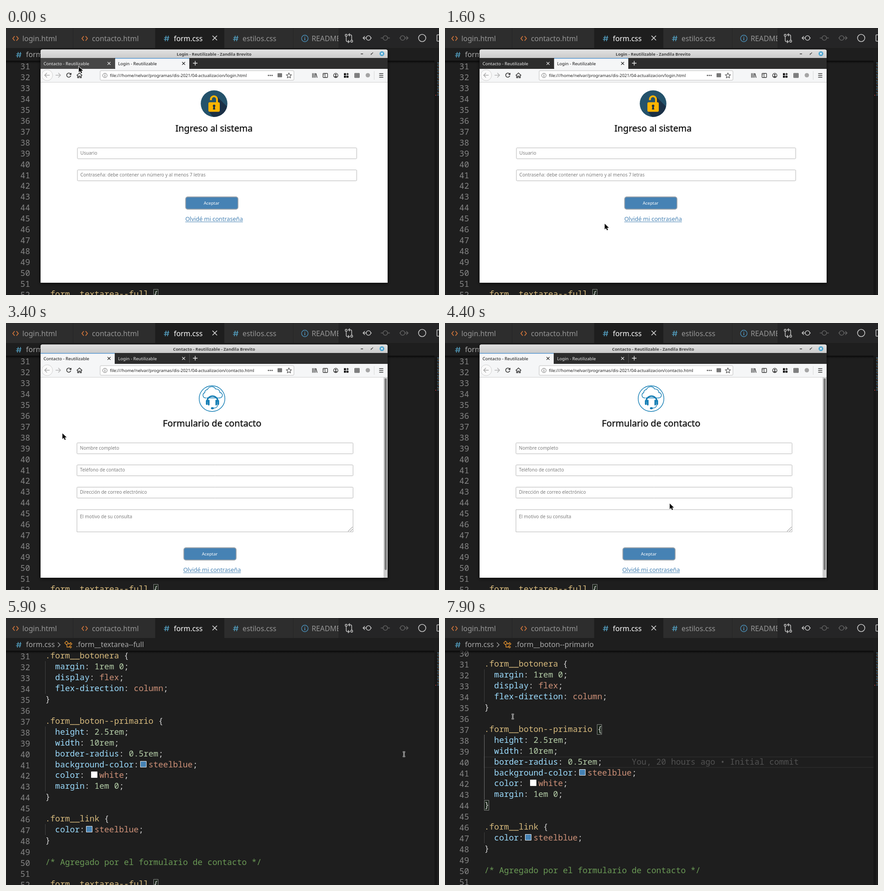
Recreate the animation shown at these times as an HTML page with a canvas. Size 952x588 px, loop 8 s.

```html
<!DOCTYPE html>
<html lang="es">
<head>
<meta charset="utf-8">
<title>Formularios</title>
<style>
  html, body { margin: 0; width: 100%; height: 100%; overflow: hidden; background: #1e1e1e; }
  canvas { display: block; }
</style>
</head>
<body>
<canvas id="stage" width="952" height="588"></canvas>
<script>
const ctx = document.getElementById('stage').getContext('2d');
const LOOP = 8000, STEP = 100;
const SWITCH = 2800, CLOSE = 5900, CLICK = 6000, BLAME = 6100, SCROLL = 7900;
const SANS = '"Noto Sans", sans-serif', MONO = '"Noto Sans Mono", monospace';
const CHAR = 10.8, LINE = 23.95, LEFT = 86.5;

const code = [
  '', '.form__botonera {', '  margin: 1rem 0;', '  display: flex;', '  flex-direction: column;', '}', '',
  '.form__boton--primario {', '  height: 2.5rem;', '  width: 10rem;', '  border-radius: 0.5rem;',
  '  background-color:steelblue;', '  color: white;', '  margin: 1em 0;', '}', '',
  '.form__link {', '  color:steelblue;', '}', '',
  '/* Agregado por el formulario de contacto */', '', '.form__textarea--full {'
];
const FIRST = 30;

// Pointer path: time, x, y
const path = [
  [0, 160, 85], [300, 160, 85], [600, 330, 240], [900, 522, 395], [1200, 346, 429], [1400, 345, 436],
  [1600, 351, 431], [1800, 290, 300], [2100, 130, 96], [2400, 142, 74], [3300, 142, 74], [3400, 124, 243],
  [3900, 564, 435], [4200, 520, 407], [4600, 468, 388], [4900, 468, 388], [5100, 652, 331], [5200, 652, 331],
  [5800, 875, 300], [6100, 875, 300], [6800, 205, 222], [7000, 167, 254], [7200, 149, 217], [LOOP, 149, 217]
];

function pointer(t) {
  const i = path.findIndex(p => p[0] > t);
  const [a, b] = [path[i - 1], path[i]];
  const k = (t - a[0]) / (b[0] - a[0]);
  return [a[1] + (b[1] - a[1]) * k, a[2] + (b[2] - a[2]) * k];
}

function box(x, y, w, h, fill, radius = 0, border, width = 1) {
  ctx.beginPath();
  ctx.roundRect(x, y, w, h, radius);
  if (fill) { ctx.fillStyle = fill; ctx.fill(); }
  if (border) { ctx.strokeStyle = border; ctx.lineWidth = width; ctx.stroke(); }
}

function disc(x, y, r, fill, border, width) {
  box(x - r, y - r, 2 * r, 2 * r, fill, r, border, width);
}

function stroke(d, color, width = 1.3) {
  ctx.strokeStyle = color;
  ctx.lineWidth = width;
  ctx.stroke(new Path2D(d));
}

function fill(d, color) {
  ctx.fillStyle = color;
  ctx.fill(new Path2D(d));
}

function text(s, x, y, size, color, { align = 'left', weight = 400, family = SANS } = {}) {
  ctx.font = `${weight} ${size}px ${family}`;
  ctx.textAlign = align;
  ctx.fillStyle = color;
  ctx.fillText(s, x, y);
}

const cross = (x, y, r, color, w) =>
  stroke(`M${x - r} ${y - r}l${2 * r} ${2 * r}M${x + r} ${y - r}l${-2 * r} ${2 * r}`, color, w);
const tagIcon = x => stroke(`M${x - 2} 18l-4 5l4 5M${x + 2} 18l4 5l-4 5`, '#d0743a', 1.8);
const hashIcon = (x, y) =>
  stroke(`M${x - 1} ${y - 6}l-2 12M${x + 4} ${y - 6}l-2 12M${x - 5} ${y - 2}h11M${x - 6} ${y + 2}h11`, '#519aba', 1.7);

function editorTabs(clicked) {
  box(0, 0, 952, 44, '#252526');
  for (const [x, w] of [[0, 147], [148, 180], [480, 151], [632, 99]]) box(x, 0, w, 44, '#2d2d2d');
  box(328, 0, 152, 44, '#1e1e1e');
  tagIcon(21);
  tagIcon(173);
  hashIcon(353, 23);
  hashIcon(505, 23);
  const label = (s, x, color = '#969696') => text(s, x, 29, 15.8, color);
  label('login.html', 36);
  label('contacto.html', 189);
  label('form.css', 369, '#fff');
  label('estilos.css', 520);
  cross(459, 22, 5, '#e0e0e0', 1.5);
  disc(657, 23, 7.2, null, '#4a8fb8', 1.4);
  stroke('M657 19v1.8M657 22v5', '#4a8fb8', 1.8);
  ctx.save();
  ctx.beginPath();
  ctx.rect(632, 0, 99, 44);
  ctx.clip();
  label('README.md', 672);
  ctx.restore();

  const icon = '#c5c5c5', dim = '#626262';
  stroke('M748 18v9q0 3 3 3h4m-3-3l3 3l-3 3M760 27v-9q0-3-3-3h-4m3-3l-3 3l3 3', icon, 1.5);
  disc(748, 16, 2.2, null, icon, 1.4);
  disc(760, 29, 2.2, null, icon, 1.4);
  disc(797, 22, 5, null, icon, 1.5);
  stroke('M792 22h-7m4-4l-4 4l4 4M802 22h2', icon, 1.5);
  disc(834, 22, 5, null, dim, 1.5);
  stroke('M824 22h5M839 22h5', dim, 1.5);
  disc(872, 22, 5, null, dim, 1.5);
  stroke('M865 22h2M877 22h7m-4-4l4 4l-4 4', dim, 1.5);
  disc(915, 22, 8, null, icon, 1.6);
  box(947.5, 15, 12, 14, null, 1, icon, 1.5);

  box(0, 44, 952, 28, '#1e1e1e');
  hashIcon(28, 59);
  text('form.css', 44, 64, 15.8, '#a9a9a9');
  stroke('M114 54l5 5l-5 5', '#a9a9a9');
  stroke('M129 55l4-4l4 4l-4 4zM136 57h4M134 59v5h5M140 56l2-2l3 3l-2 2zM139 63l2-2l3 3l-2 2z', '#e0912f', 1.4);
  text(clicked ? '.form__boton--primario' : '.form__textarea--full', 154, 64, 15.8, '#a9a9a9');
}

function codeLine(line, y) {
  let x = LEFT;
  const put = (s, color) => {
    text(s, x, y, 18, color, { family: MONO });
    x += s.length * CHAR;
  };
  const rule = line.match(/^(  )([\w-]+)(: ?)(.*);$/);
  if (rule) {
    x += 2 * CHAR;
    put(rule[2], '#9cdcfe');
    put(rule[3], '#d4d4d4');
    if (/blue|white/.test(rule[4])) {
      box(Math.round(x + 3) + .5, y - 13.5, 13, 13, rule[4], 0, '#eee');
      x += 21.5;
    }
    put(rule[4], /\d/.test(rule[4]) ? '#b5cea8' : '#ce9178');
    put(';', '#d4d4d4');
  } else if (line[0] === '.') {
    put(line.slice(0, -1), '#d7ba7d');
    put('{', '#d4d4d4');
  } else put(line, line[0] === '/' ? '#6a9955' : '#d4d4d4');
}

function editor(t) {
  const clicked = t >= CLICK, scroll = t >= SCROLL ? 18 : 0;
  const base = n => Math.round(89 + (n - 31) * LINE) + scroll;
  const brace = (n, column) =>
    box(Math.floor(LEFT + column * CHAR) + .5, base(n) - 16.5, 10, 22, 'rgba(0,100,0,.1)', 0, '#888');
  box(0, 44, 952, 544, '#1e1e1e');
  if (clicked) {
    box(86, base(40) - 17, 857, 23, null, 0, '#282828', 2);
    brace(37, 23);
    brace(44, 0);
  } else brace(52, 22);
  code.forEach((line, i) => {
    const n = FIRST + i, y = base(n);
    if (line[0] === ' ') box(86, y - 18, 1, 24, clicked && n > 37 && n < 44 ? '#707070' : '#404040');
    codeLine(line, y);
    text(n, 53, y + 2, 18, '#858585', { align: 'right', family: MONO });
  });
  if (t >= BLAME) text('You, 20 hours ago • Initial commit', 410.5, base(40), 18, '#515151', { family: MONO });
  if (clicked && (t - CLICK) % 1000 < 500) box(346, base(40) - 17, 2, 23, '#aeafad');

  box(942, 72, 6, 516, '#171717');
  ['#51768a', '#77694a', '#456b85', '#6c5547'].forEach((c, i) => {
    for (let y = 76 + i * 3; y < 148; y += 13) box(948 + i % 2, y, 4 - i % 2, 1.5, c);
  });
  box(944, 147, 2, 2, '#a03030');
  const shade = ctx.createLinearGradient(0, 72, 0, 78);
  shade.addColorStop(0, '#000b');
  shade.addColorStop(1, '#0000');
  box(0, 72, 942, 6, shade);
  editorTabs(clicked);
}

function browserFrame(contact, hover) {
  ctx.save();
  ctx.shadowColor = '#000a';
  ctx.shadowBlur = 9;
  ctx.shadowOffsetY = 2;
  box(76, 47.5, 763, 513.5, '#fff', [4, 4, 0, 0]);
  ctx.restore();
  const bar = ctx.createLinearGradient(0, 47, 0, 66);
  bar.addColorStop(0, '#e2e2e2');
  bar.addColorStop(1, '#cbcbcb');
  box(76, 47.5, 763, 19, bar, [4, 4, 0, 0]);
  const name = contact ? 'Contacto' : 'Login';
  text(`${name} - Reutilizable - Zandila Brevito`, 457.5, 60.5, 9.2, '#444', { align: 'center', weight: 700 });
  stroke('M780 57h5', '#333', 1.5);
  stroke('M803 58v-2M804 57l3-3M802 59l3-3', '#444', 1.2);
  disc(826.5, 56.5, 5.2, '#4aa3cf');
  cross(826.5, 56.5, 2, '#fff', 1.2);

  box(76, 66, 763, 24, '#2d2d2d');
  const tab = (s, x, w, active, lit) => {
    if (active || lit) box(x, 66, w, 24, active ? '#f5f6f7' : '#464646');
    if (active) box(x, 66, w, 1.5, '#5294cf');
    const color = active ? '#111' : '#f0f0f0';
    text(`${s} - Reutilizable`, x + 6.5, 81.5, 9.6, color);
    cross(x + w - 12.5, 78, 3.2, color, 1.2);
  };
  tab('Contacto', 76, 163, contact, hover);
  tab('Login', 240, 163, !contact);
  box(contact ? 403 : 239, 68, 1, 20, '#555');
  stroke('M411 77.5h10M416 72.5v10', '#eee', 1.4);

  box(76, 90, 763, 29, '#f5f6f7');
  box(76, 119, 763, 1, '#cfcfcf');
  disc(90.5, 104, 12, '#fafafa', '#cfcfcf', 1);
  stroke('M96 104h-11m5-5l-5 5l5 5', '#aaa', 1.5);
  stroke('M109 104h11m-5-5l5 5l-5 5', '#b5b5b5', 1.5);
  const ink = '#333';
  stroke('M142 101.5a4.6 4.6 0 1 0 .5 3.5M143 99v3.5h-3.5', ink, 1.6);
  stroke('M155.5 104.5l6-5.5l6 5.5M157.5 104v5.5h2.5v-3.5h3v3.5h2.5V104', ink, 1.6);
  box(207, 94, 426, 21, '#fff', 2, '#bdbdbd');
  disc(217.5, 104.5, 4.8, null, '#666', 1);
  stroke('M217.5 101.5v1.2M217.5 103.8v3.5', '#555', 1.2);
  const page = contact ? 'contacto' : 'login';
  text(`file:///home/nelvar/programas/dis-2021/04-actualizacion/${page}.html`, 228.5, 107.7, 9.47, '#222');
  for (const x of [577, 581, 585]) disc(x, 104.5, 1.4, '#555');
  box(597, 99.5, 10, 9, '#777', 1);
  stroke('M622 99l1.7 3.6l4 .5l-3 2.7l.8 4l-3.5-2l-3.5 2l.8-4l-3-2.7l4-.5z', '#555', 1.2);
  stroke('M674 99.5v10M677 99.5v10M680 99.5v10M681.5 100l2.5 9.5', ink, 1.4);
  box(697, 100, 10, 9, null, 1, ink, 1.3);
  stroke('M701.5 100v9M698 103h2', ink, 1.1);
  disc(725, 104.5, 4.8, null, ink, 1.3);
  disc(725, 103, 1.7, ink);
  fill('M721.8 107.5q3.2-4 6.4 0q-3 2.6-6.4 0', ink);
  for (const [x, y] of [[743, 99.5], [743, 105], [748.5, 105]]) box(x, y, 4.5, 4.5, '#111');
  stroke('M751 99v5M748.5 101.5h5', '#111', 1.5);
  box(767, 100, 9.5, 9, null, 0, '#222', 1.2);
  stroke('M770.2 100v9M773.4 100v9M767 103h9.5M767 106h9.5', '#222', 1.1);
  disc(795.5, 104, 4.8, '#a5a5a5');
  box(809, 95, 1, 19, '#d8d8d8');
  stroke('M820.5 100.5h9M820.5 104.5h9M820.5 108.5h9', ink, 1.4);
}

const loginFields = [[157, 264, 614, 24], [157, 312.5, 614, 24]];
const contactFields = [[156, 264, 607, 24], [156, 312.5, 607, 24], [156, 361.5, 607, 24], [156, 411, 607, 49]];
const loginHints = ['Usuario', 'Contraseña: debe contener un número y al menos 7 letras'];
const contactHints = ['Nombre completo', 'Teléfono de contacto', 'Dirección de correo electrónico', 'El motivo de su consulta'];

function form(title, fields, hints, center, buttonX, buttonY) {
  text(title, center, 228, 19.8, '#111', { align: 'center', weight: 500 });
  ctx.lineWidth = .4;
  ctx.strokeStyle = '#111';
  ctx.strokeText(title, center, 228);
  fields.forEach(([x, y, w, h], i) => {
    box(x, y, w, h, '#fff', h > 30 ? 0 : 1.5, '#b3b3b3');
    text(hints[i], x + 6.5, y + (h > 30 ? 19 : 14.5), 10.1, '#7c7c7c');
  });
  box(buttonX, buttonY, 115, 27, '#4682b4', 4.5, '#98a2ab', 1.8);
  text('Aceptar', buttonX + 57, buttonY + 17, 9.5, '#fff', { align: 'center' });
  const link = 'Olvidé mi contraseña', y = buttonY + 53;
  text(link, center, y, 12.75, '#4682b4', { align: 'center' });
  const w = ctx.measureText(link).width;
  box(center - w / 2, y + 1.5, w, 1, '#4682b4');
}

function loginPage() {
  ctx.save();
  ctx.beginPath();
  ctx.arc(457.5, 166.5, 29.3, 0, 7);
  ctx.fillStyle = '#24526b';
  ctx.fill();
  ctx.clip();
  fill('M464 151l40 40v30h-30l-28-37l22-3z', '#1b3046');
  ctx.restore();
  stroke('M450.5 159v-2a6.7 6.7 0 0 1 13.4 0v8', '#ffb400', 4);
  box(445, 163.5, 25, 21, '#ffb400', 3);
  disc(457.5, 171.5, 2.8, '#1b3046');
  fill('M456.3 172h2.4l1.4 7.5h-5.2z', '#1b3046');
  form('Ingreso al sistema', loginFields, loginHints, 457.5, 395, 372);
}

function contactPage() {
  const blue = '#0f7bb3';
  disc(453, 166.5, 28.3, null, blue, 1.4);
  stroke('M440 165h-2a6 6 0 0 1-1-11.5a6.5 6.5 0 0 1 6-7a10 10 0 0 1 18-1a7.5 7.5 0 0 1 9 7.5a6 6 0 0 1-.5 12h-3M441 165h25', blue, 1.4);
  stroke('M442 174v-1a11.8 11.8 0 0 1 24 0v1', blue, 3);
  stroke('M466 180q-1 6.5-9 7.5', blue, 1.4);
  box(439.5, 169.5, 4, 11, blue, 2);
  box(444, 169, 3.5, 12.5, blue, 1.5);
  box(460.5, 169, 3.5, 12.5, blue, 1.5);
  box(464.5, 169.5, 4, 11, blue, 2);
  box(450.5, 185.5, 6.5, 4.5, blue, 2.2);
  form('Formulario de contacto', contactFields, contactHints, 453, 391, 495);
  stroke('M752 459l10-10M757 459l5-5', '#777', 1);
  box(830, 120, 9, 441, '#cdcdcd');
  box(832.5, 122, 4.5, 422, '#777', 2.2);
}

function drawPointer(x, y, beam) {
  if (beam) {
    const d = `M${x - 2.5} ${y - 5}h5M${x} ${y - 5}v10M${x - 2.5} ${y + 5}h5`;
    stroke(d, '#fff', 2.6);
    stroke(d, '#111', .9);
  } else {
    const d = `M${x} ${y}v12.5l3-2.7l2 4.7l2.3-1l-2-4.5h4z`;
    stroke(d, '#fff', 1.6);
    fill(d, '#0a0a0a');
  }
}

function draw(t) {
  const [x, y] = pointer(t), contact = t >= SWITCH, open = t < CLOSE;
  const inside = (bx, by, w, h) => x >= bx && x < bx + w && y >= by && y < by + h;
  editor(t);
  if (open) {
    browserFrame(contact, inside(76, 66, 163, 24));
    (contact ? contactPage : loginPage)();
  }
  const overField = (contact ? contactFields : loginFields).some(f => inside(...f));
  drawPointer(x, y, overField || !open || !inside(76, 47, 763, 514));
}

function tick() {
  draw(Math.floor(performance.now() % LOOP / STEP) * STEP);
  requestAnimationFrame(tick);
}
tick();
</script>
</body>
</html>
```
